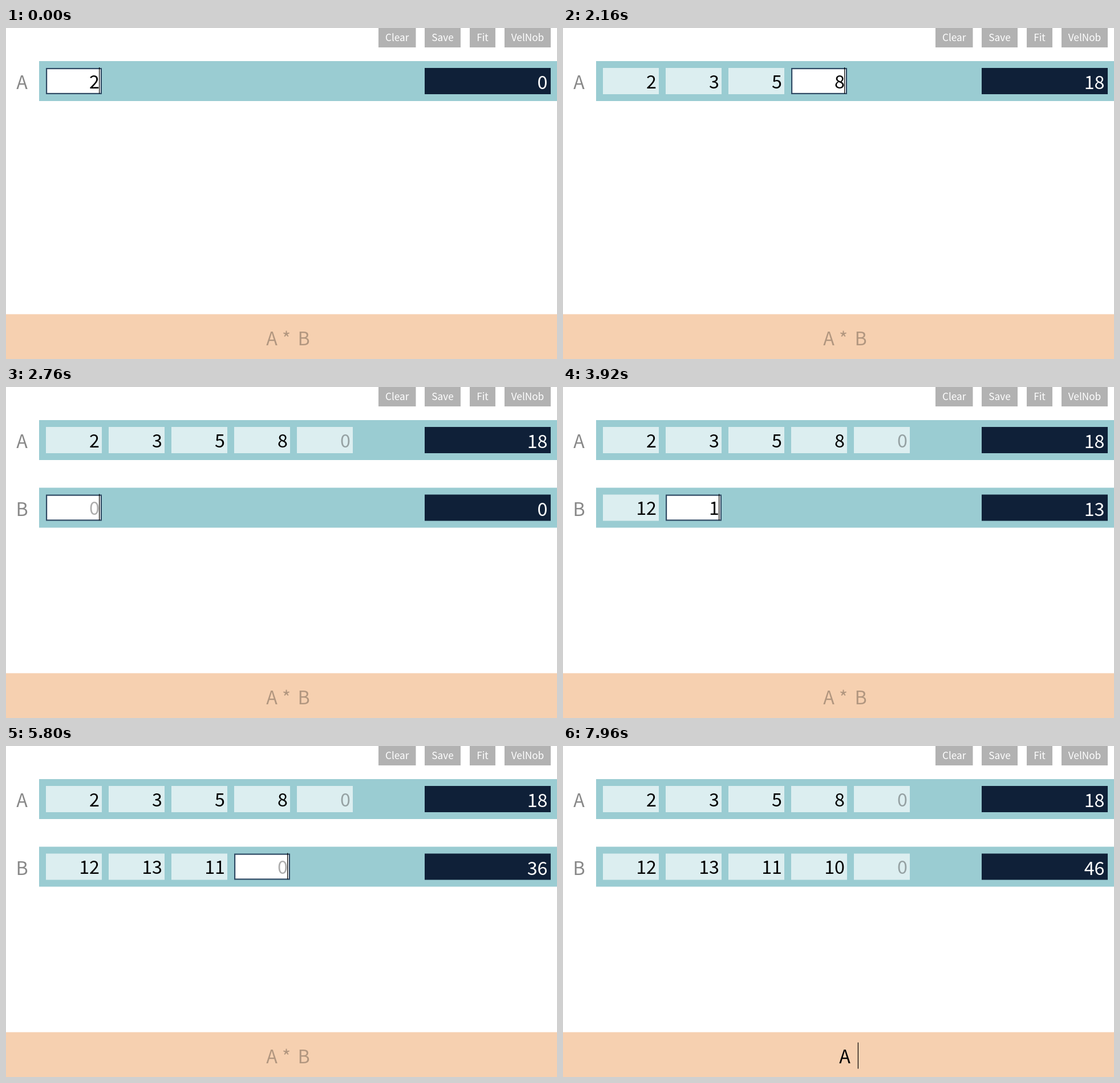
Write an HTML page that moves like this. It is 966 by 580 pixels and loops after 8 s.

```html
<!DOCTYPE html>
<html lang="en">
<head>
<meta charset="utf-8">
<style>
html, body { margin: 0; width: 100%; height: 100%; overflow: hidden; background: #fff; }
svg { display: block; font: 32.24px "Noto Sans CJK JP", "Noto Sans CJK SC", "Noto Sans CJK", sans-serif; }
</style>
</head>
<body>
<svg id="stage" width="966" height="580" viewBox="0 0 966 580"></svg>
<script>
const LOOP = 8000, SUM_LAG = 40, ROW_STEP = 118.5;
const HINT = 'fill-opacity=".32"';

// Keystrokes: time in ms and key
const keys = [
  [0, '2'], [320, 'Tab'], [560, '3'], [960, 'Tab'], [1280, '5'], [1640, 'Tab'],
  [2040, '8'], [2440, 'Tab'], [2720, 'Enter'],
  [3120, '1'], [3320, '2'], [3640, 'Tab'], [3880, '1'], [4080, '3'], [4580, 'Tab'],
  [4920, '1'], [5320, '1'], [5800, 'Tab'], [6080, '1'], [6240, '0'], [7000, 'Tab'],
  [7280, 'Formula'], [7920, 'A']
];

const buttons = [[653, 65.5, 'Clear'], [734, 63, 'Save'], [813, 45, 'Fit'], [874, 81, 'VelNob']];

const rect = (x, y, w, h, fill, extra = '') =>
  `<rect x="${x}" y="${y}" width="${w}" height="${h}" fill="${fill}" ${extra}/>`;
const text = (x, y, str, fill, anchor = 'middle', extra = '') =>
  `<text x="${x}" y="${y}" fill="${fill}" text-anchor="${anchor}" xml:space="preserve" ${extra}>${str}</text>`;

// Replays the keys pressed up to time t
function sheetAt(t) {
  const rows = [['']];
  let formula = null;
  for (const [time, key] of keys) {
    if (time > t) break;
    const row = rows[rows.length - 1];
    if (key === 'Tab') row.push('');
    else if (key === 'Enter') rows.push(['']);
    else if (key === 'Formula') formula = '';
    else if (formula !== null) formula += key;
    else row[row.length - 1] += key;
  }
  return { rows, formula };
}

function caretAlpha(t) {
  if (t >= 6600 && t < 6680) return 0.5;
  return (t >= 6680 && t < 7000) || (t >= 7760 && t < 7920) ? 0 : 1;
}

function drawCell(x, y, value, focused, alpha) {
  let out = focused
    ? rect(x + 1.1, y + 1.1, 95.8, 43.8, '#fff', 'stroke="#2f4a64" stroke-width="2.2"')
    : rect(x, y, 98, 46, '#dceef0');
  out += text(x + 94, y + 35.5, value || '0', '#000', 'end', value ? '' : HINT);
  if (focused) out += rect(x + 93, y - 1, 1.2, 46, '#000', `opacity="${alpha}"`);
  return out;
}

function drawRow(cells, i, total, active, alpha) {
  const y = 58 + i * ROW_STEP;
  return text(28, y + 49, 'AB'[i], '#888') +
    rect(58, y, 908, 70, '#9accd2') +
    cells.map((v, n) =>
      drawCell(70 + n * 110, y + 12, v, active && n === cells.length - 1, alpha)).join('') +
    rect(734, y + 12, 221, 46, '#0f2038') +
    text(949.5, y + 49, total, '#fff', 'end');
}

function drawFormula(formula, alpha) {
  let out = rect(0, 501.5, 966, 79, '#f6d0b0');
  if (formula) out += text(494, 556, formula, '#000');
  else {
    const hint = 'fill-opacity=".28"';
    out += text(466, 556, 'A', '#000', 'middle', hint) +
      text(491.5, 556, '*', '#000', 'middle', hint) +
      text(522, 556, 'B', '#000', 'middle', hint);
  }
  if (formula !== null) {
    out += rect(formula ? 516.8 : 500.4, 519.5, 1.2, 46, '#000', `opacity="${alpha}"`);
  }
  return out;
}

function draw(t) {
  const { rows, formula } = sheetAt(t);
  const settled = sheetAt(t - SUM_LAG).rows;
  const alpha = caretAlpha(t);
  const sum = i => (settled[i] || []).reduce((a, v) => a + Number(v), 0);
  return buttons.map(([x, w, label]) =>
      rect(x, 0, w, 34, '#b2b2b2') +
      text(x + w / 2, 23, label, '#fff', 'middle', 'font-size="17.2"')).join('') +
    rows.map((cells, i) =>
      drawRow(cells, i, sum(i), formula === null && i === rows.length - 1, alpha)).join('') +
    drawFormula(formula, alpha);
}

const stage = document.getElementById('stage');
const start = performance.now();
let shown = '';
function tick() {
  const markup = draw((performance.now() - start) % LOOP);
  if (markup !== shown) stage.innerHTML = shown = markup;
  requestAnimationFrame(tick);
}
tick();
</script>
</body>
</html>
```
